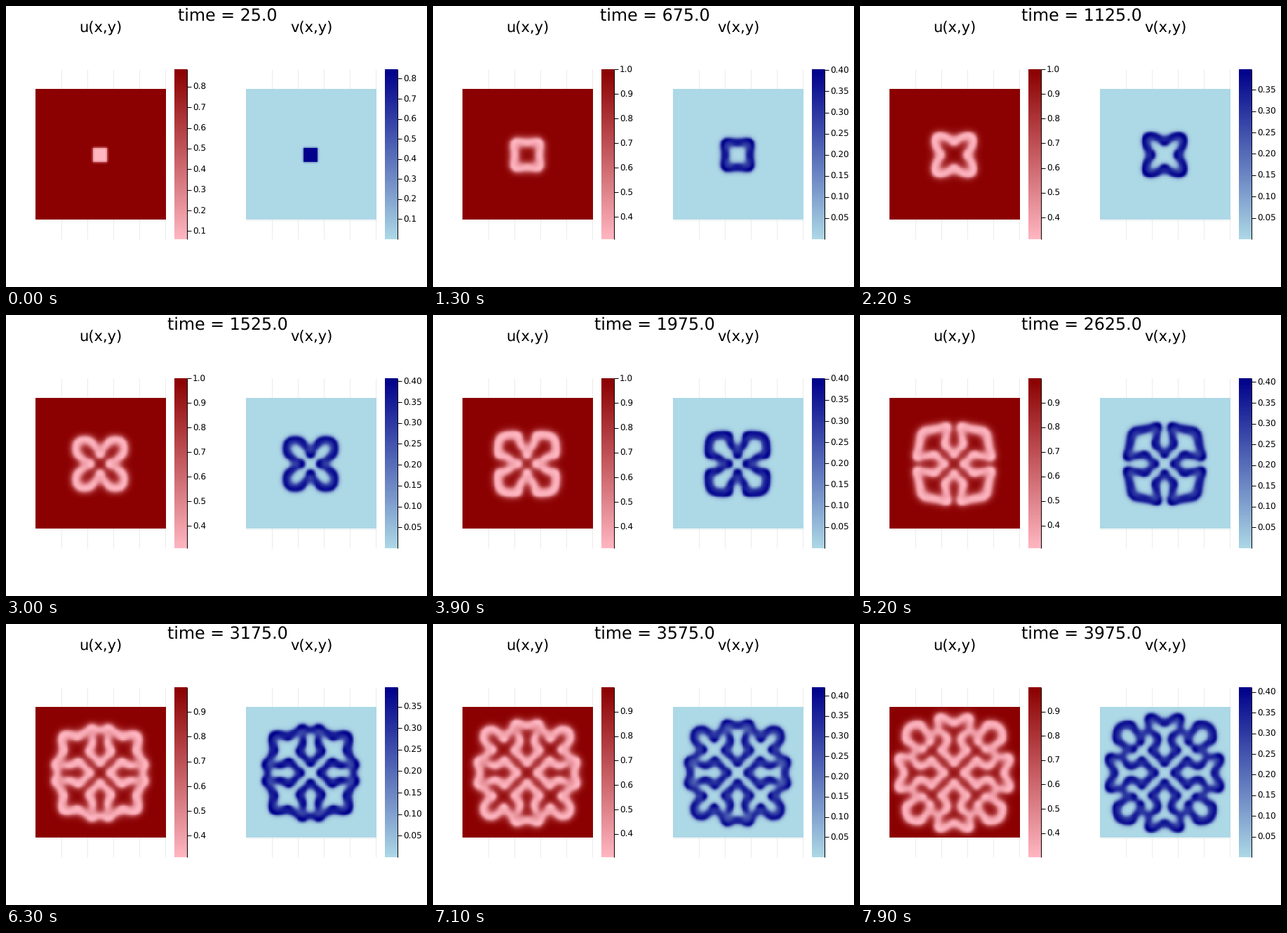
Animation of 600 by 400 pixels, one loop 8 s. Source, as a matplotlib script:

```python
import numpy as np
import matplotlib.pyplot as plt
from matplotlib.animation import FuncAnimation
from matplotlib.colors import LinearSegmentedColormap

W, H, DPI = 600, 400, 100
FRAMES, INTERVAL = 80, 100
T0, DT_FRAME = 25, 50
PX = 72 / DPI                        # points per pixel

# Gray-Scott reaction-diffusion on a periodic grid
N = 100
DU, DV = 0.16, 0.08
FEED, KILL = 0.055, 0.062
WARMUP = 3


def lap(a):
    p = np.pad(a, 1, mode="wrap")
    return p[:-2, 1:-1] + p[2:, 1:-1] + p[1:-1, :-2] + p[1:-1, 2:] - 4 * a


def advance(u, v, span, dt):
    for _ in range(round(span / dt)):
        vv = v * v
        un = (u + dt * (DU * lap(u) + FEED)) / (1 + dt * (FEED + vv))
        v = v + dt * (DV * lap(v) + un * vv - (FEED + KILL) * v)
        u = un
    return u, v


def simulate():
    u = np.full((N, N), 0.8638)
    v = np.zeros((N, N))
    seed = np.s_[44:55, 44:55]
    u[seed], v[seed] = 0, 1.06
    u, v = advance(u, v, WARMUP, 0.05)
    states = [(u, v)]
    for _ in range(FRAMES - 1):
        u, v = advance(u, v, DT_FRAME, 0.5)
        states.append((u, v))
    return states


def tick_step(span):
    """Half of a 1-2-5 style major unit."""
    base = 10.0 ** np.floor(np.log10(span))
    f = span / base
    unit = 2 if f > 5 else 1 if f > 2.5 else 0.5 if f > 1 else 0.2
    return 0.5 * unit * base


plt.rcParams["font.family"] = "DejaVu Sans"
plt.rcParams["text.hinting"] = "none"
fig = plt.figure(figsize=(W / DPI, H / DPI), dpi=DPI, facecolor="white")
ax = fig.add_axes([0, 0, 1, 1])


def label(x, y, s, size, ha="center"):
    return ax.text(x, y, s, fontsize=size * PX, ha=ha, va="baseline", color="black")


def line(x, y, color="black", z=3):
    return ax.plot(x, y, color=color, lw=PX, zorder=z, solid_capstyle="butt")[0]


class Panel:
    TOP, BOTTOM = 90, 332
    SIDE = 185.6
    SLOTS = 12

    def __init__(self, x, title, low, high):
        cmap = LinearSegmentedColormap.from_list(title, [low, high])
        left, right = x + 0.4, x + 0.4 + self.SIDE
        for t in range(20, N + 1, 20):
            gx = left + (t - 0.5) * self.SIDE / N
            line([gx, gx], [self.TOP, self.BOTTOM], "#ebebeb", 1)
        line([left, right], [304.5, 304.5], "#ebebeb", 1)
        self.img = ax.imshow(np.zeros((N, N)), cmap=cmap, origin="lower", aspect="auto",
                             extent=(left, right, 118 + self.SIDE, 118),
                             interpolation="nearest", zorder=2)
        ax.imshow(np.linspace(0, 1, 256)[:, None], cmap=cmap, origin="lower", aspect="auto",
                  extent=(x + 198, x + 216, self.BOTTOM, self.TOP), zorder=2)
        label(x + 93.2, 38, title, 21)
        self.x = x + 215.5
        line([self.x, self.x], [self.TOP, self.BOTTOM])
        self.ticks = [(line([], []), label(x + 223.8, 0, "", 12, "left"))
                      for _ in range(self.SLOTS)]

    def show(self, data):
        lo, hi = data.min(), data.max()
        self.img.set_data(data)
        self.img.set_clim(lo, hi)
        step = tick_step(hi - lo)
        digits = 1 if step > 0.09 else 2
        first = int(np.floor(lo / step)) + 1
        for i, (mark, text) in enumerate(self.ticks, first):
            val = i * step
            on = val <= hi + 1e-9
            mark.set_visible(on)
            text.set_visible(on)
            if on:
                y = self.BOTTOM - (val - lo) / (hi - lo) * (self.BOTTOM - self.TOP)
                mark.set_data([self.x, self.x + 6.5], [y, y])
                text.set_y(y + 4.4)
                text.set_text(f"{val:.{digits}f}")


panels = [Panel(42, "u(x,y)", "lightpink", "darkred"),
          Panel(342, "v(x,y)", "lightblue", "darkblue")]
clock = label(316, 21, "", 23.75)
ax.set_xlim(0, W)
ax.set_ylim(H, 0)
ax.axis("off")

states = simulate()


def draw(i):
    for panel, data in zip(panels, states[i]):
        panel.show(data)
    clock.set_text(f"time = {T0 + DT_FRAME * i:.1f}")
    return []


anim = FuncAnimation(fig, draw, frames=FRAMES, init_func=lambda: draw(0),
                     interval=INTERVAL, repeat=True, repeat_delay=0, blit=False)
plt.show()
```
